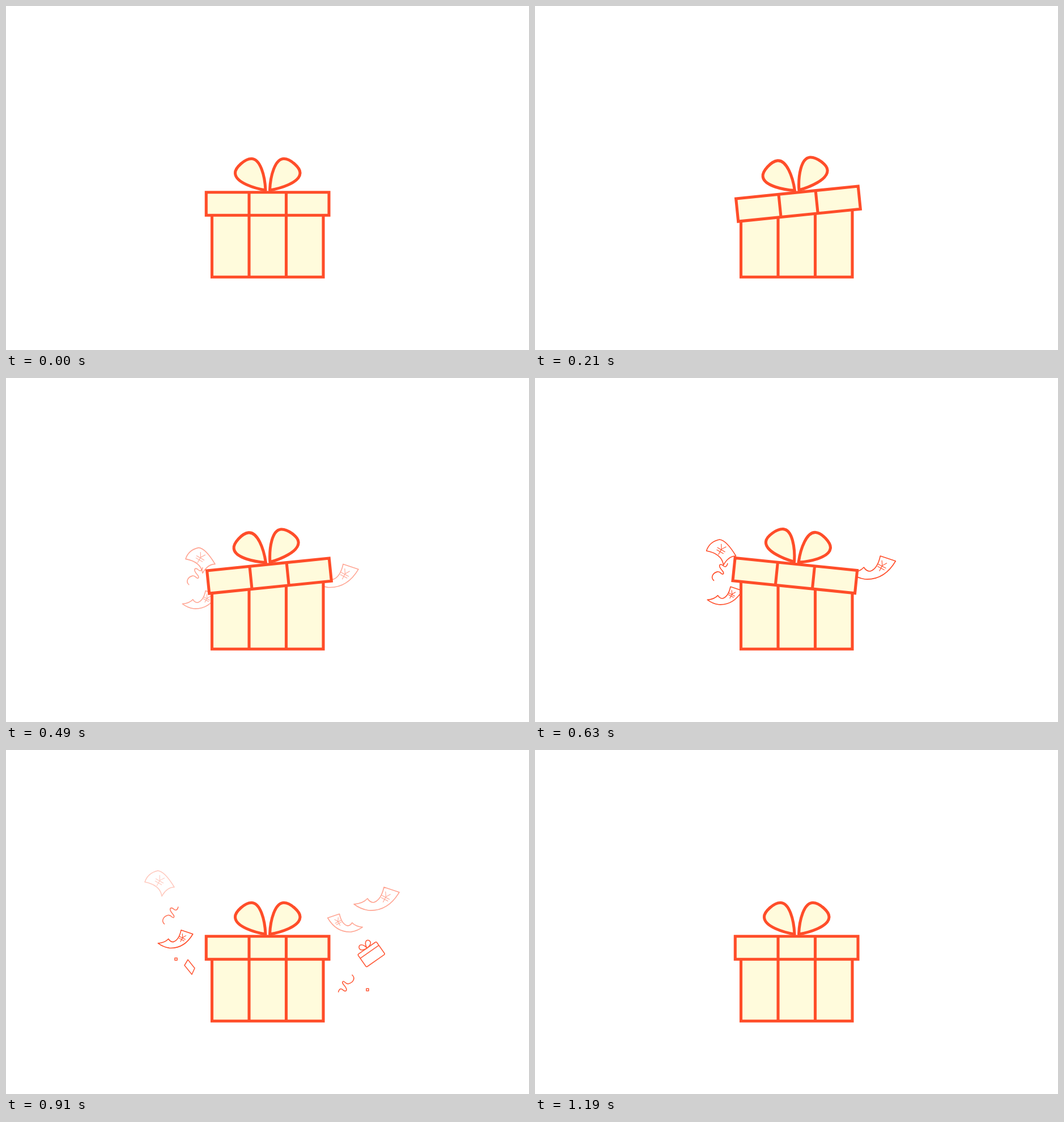
These frames come from a looping animation (923 px wide and 607 px high, 1260 ms). An HTML page:

```html
<!DOCTYPE html>
<html lang="en">
<head>
<meta charset="utf-8">
<title>Gift box</title>
<style>
  html, body { margin: 0; width: 100%; height: 100%; overflow: hidden; background: #fff; }
  svg { display: block; width: 100vw; height: 100vh; }
  .box { stroke: #ff4d29; stroke-width: 5.1; fill: #fffbdc; }
  #confetti { stroke: #ff4d29; stroke-width: 1.6; fill: none; stroke-linejoin: round; }
  .thin { vector-effect: non-scaling-stroke; }
</style>
</head>
<body>
<svg viewBox="0 0 923 607">
  <defs>
    <path id="yen" class="thin" d="M-5 -9L0 -1L5 -9M0 -1V10M-8 0H8M-7 4H7" stroke-width="1.1"/>
    <g id="sheet">
      <path d="M-26 2Q-21 -14 -3 -18Q9 -17 26 11Q13 11 4 27Q1 7 -26 2Z"/>
      <use href="#yen" transform="rotate(30)"/>
    </g>
    <g id="curl">
      <path class="thin" d="M-40 9Q-24 8 -16 -1Q-12 6 -5 6Q8 2 13 -21L40 -12Q20 22 -14 20Q-28 18 -40 9Z"/>
      <use href="#yen" transform="translate(16 -3) rotate(28)"/>
    </g>
    <path id="squiggle" d="M-10 16C-17 10 -12 2 -4 0C2 -1 3 6 6 4C10 0 -3 -6 0 -12C4 -16 6 -8 10 -9Q13 -10 14 -15"/>
    <path id="slip" d="M-9 -3L-3 -13L9 2L4 13Z"/>
    <path id="dot" d="M-2 -2H2V2H-2Z"/>
    <g id="gift">
      <rect x="-20" y="3.5" width="40" height="27" rx="2"/>
      <path d="M-20 11.5H20M0 3.5C-6 3.5 -13 1 -11 -5C-8 -11 -1 -7 0 3.5C1 -7 8 -11 11 -5C13 1 6 3.5 0 3.5"/>
    </g>
    <path id="loop" stroke-linejoin="round"
      d="M458 325C440 322 405 312 404.5 295C404 285 422 269.5 433 269.5C449 269.5 457 300 458 325Z"/>
  </defs>
  <g id="confetti"></g>
  <path class="box" d="M363.5 345H560V478.3H363.5ZM429 345V478.3M494.5 345V478.3"/>
  <g id="lid" class="box">
    <path d="M353.3 328.8H570V369.2H353.3ZM429 328.8V369.2M494.5 328.8V369.2"/>
    <use href="#loop"/>
    <use href="#loop" transform="translate(923.5) scale(-1 1)"/>
  </g>
</svg>
<script>
const STEP = 70, STEPS = 18, UNIT = 14.4, MIDDLE = 461.5;
const SWAYS = 12, TILT = 5.8;
const BURST = 11, REST = 13, CUT = 17;

// x, y: where a piece is when its burst ends
const pieces = [
  { shape: 'sheet', x: 271, y: 231 },
  { shape: 'squiggle', x: 290, y: 291.5 },
  { shape: 'curl', x: 299, y: 334, size: 'scale(.77)' },
  { shape: 'slip', x: 324, y: 383 },
  { shape: 'dot', x: 300, y: 369 },
  { shape: 'curl', x: 654, y: 263 },
  { shape: 'curl', x: 598.5, y: 305.5, size: 'scale(-.77 .77)', start: BURST },
  { shape: 'gift', x: 635, y: 346.7, spin: -35 },
  { shape: 'squiggle', x: 600.5, y: 412.5, size: 'scale(-1)' },
  { shape: 'dot', x: 638, y: 423 },
];

const confetti = document.getElementById('confetti');
const lid = document.getElementById('lid');
const clamp = (v, lo, hi) => Math.min(hi, Math.max(lo, v));

// Higher pieces fly further, appear sooner and fade sooner.
for (const p of pieces) {
  p.side = p.x < MIDDLE ? -1 : 1;
  p.dy = Math.round((508 - p.y) / 68);
  p.dx = p.side > 0 ? 3 : Math.max(2, p.dy - 1);
  p.drift = p.side > 0 ? Math.min(1, p.dy / 2) : 0.5;
  p.lift = p.side > 0 ? 2 - p.drift : 1;
  p.start ??= p.dy > 2 ? 5 : 9.3;
  p.end = Math.min(19.7, 16 + (p.y - 231) / 35);
  p.el = document.createElementNS('http://www.w3.org/2000/svg', 'use');
  p.el.setAttribute('href', '#' + p.shape);
  confetti.appendChild(p.el);
}

// Slow creep from behind the box, quick burst, then a drift upwards
function offset({ side, dx, dy, drift, lift }, s) {
  const age = s - REST;
  if (age >= 0) return [side * Math.floor(drift * Math.min(2, age)), -lift * age];
  const burst = Math.min(1, -age / (REST - BURST));
  const creep = Math.max(0, BURST - s) / 4;
  return [
    -side * (dx * burst + (dx - 1) * creep),
    dy * burst + Math.max(0, dy - 2) * creep,
  ];
}

function opacity({ start, end }, s) {
  if (s >= CUT) return 0;
  const fadeIn = clamp((s - start) / 4, 0, 1);
  const fadeOut = clamp((end - s) / 5.5, 0, 1) ** 2;
  return Math.min(fadeIn, fadeOut);
}

function draw(s) {
  const angle = s < SWAYS ? TILT * Math.sin(s * Math.PI / 2) : 0;
  lid.setAttribute('transform', `rotate(${angle.toFixed(3)} 464 321)`);

  for (const p of pieces) {
    const [ox, oy] = offset(p, s);
    const turn = (p.spin ?? 0) * clamp(s - 12, -1, 1);
    p.el.setAttribute('transform',
      `translate(${p.x + ox * UNIT} ${p.y + oy * UNIT}) rotate(${turn}) ${p.size ?? ''}`);
    p.el.setAttribute('opacity', opacity(p, s));
  }
}

const begin = performance.now();
function tick() {
  draw(Math.floor((performance.now() - begin) / STEP) % STEPS);
  requestAnimationFrame(tick);
}
tick();
</script>
</body>
</html>
```
